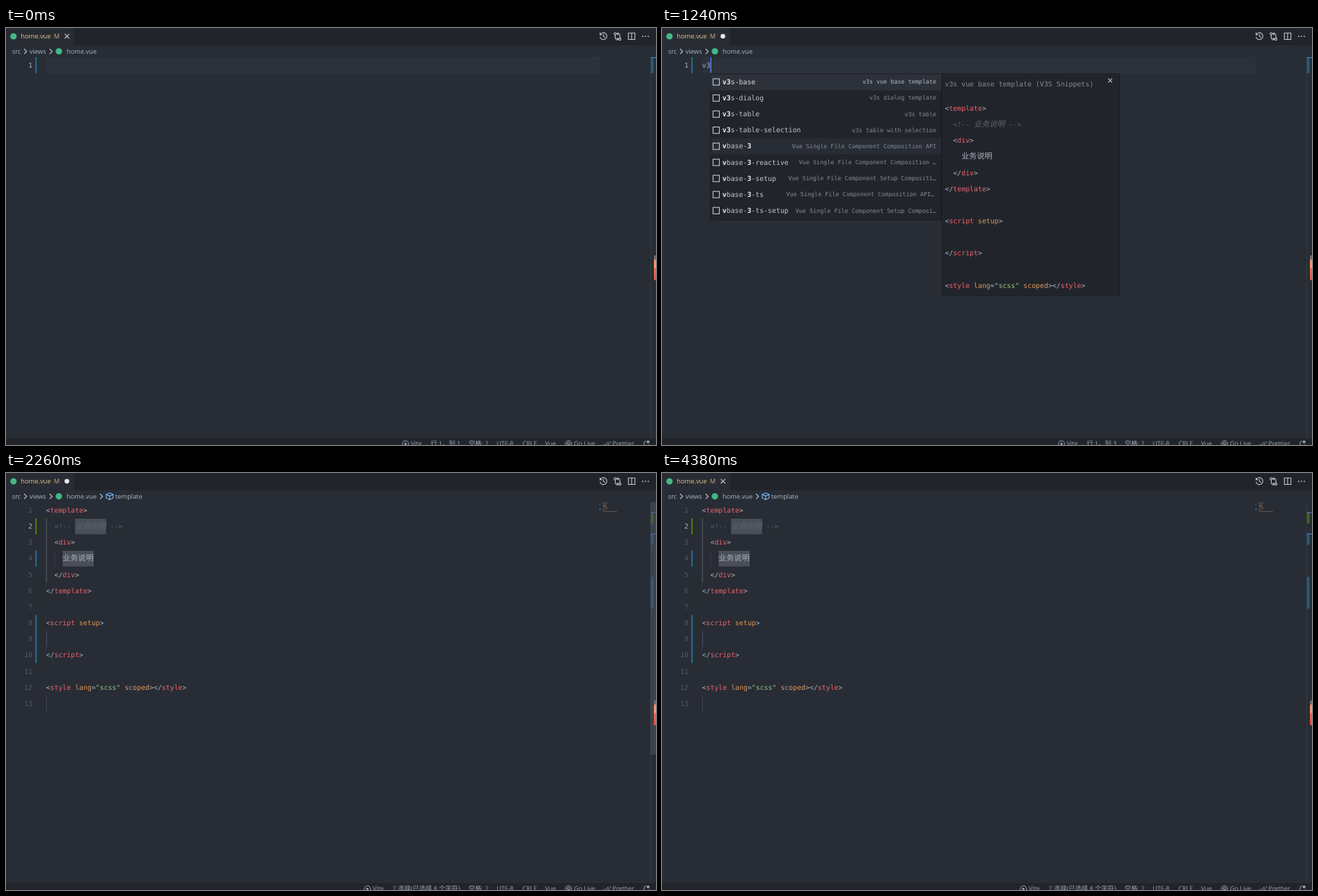
These frames come from a looping animation (934 px wide and 600 px high, 4.54 s). An HTML page:

```html
<!DOCTYPE html>
<html lang="zh">
<head>
<meta charset="utf-8">
<title>Snippet completion</title>
<style>
  html, body { margin: 0; width: 100%; height: 100%; overflow: hidden; background: #282c34; }
  svg { display: block; }
  text { white-space: pre; fill: #abb2bf; text-rendering: geometricPrecision; }
  .ui { font: 9.3px "Open Sans", "Noto Sans CJK SC", sans-serif; }
  .status { font: 9px "Open Sans", "Noto Sans CJK SC", sans-serif; fill: #9da5b4; }
  .code { font: 9.87px "DejaVu Sans Mono", "Noto Sans CJK SC", monospace; }
  .detail { font: 8.42px "DejaVu Sans Mono", monospace; fill: #848a95; }
  .cjk { font-family: "Noto Sans CJK SC", sans-serif; font-size: 11.1px; }
  .status .cjk { font-size: 9.3px; }
  .match { font-weight: bold; fill: #eceef2; }
  .line { fill: none; stroke: #c5c9d0; stroke-width: 1.1; }
  .thin { fill: none; stroke: #9da5b4; stroke-width: 1; }
</style>
</head>
<body>
<svg id="stage" width="934" height="600" viewBox="0 0 934 600">
  <defs>
    <pattern id="hatch" width="3" height="3" patternUnits="userSpaceOnUse">
      <rect width="3" height="3" fill="#1f5467"/>
      <path d="M0 3L3 0" stroke="#1b81a8" stroke-width="1.3"/>
    </pattern>
    <linearGradient id="warm" x2="0" y2="1">
      <stop stop-color="#f58b5c"/><stop offset=".4" stop-color="#f9a070"/>
      <stop offset=".4" stop-color="#ee6c4c"/><stop offset="1" stop-color="#e9503f"/>
    </linearGradient>
  </defs>
  <g id="scene"></g>
</svg>
<script>
const LOOP = 4540;
const STEPS = [0, 540, 960, 1100, 1240, 1500, 1760, 1880, 2010, 2260, 2600, 2720,
  3180, 3730, 3960, 4120, 4260, 4380];
const CHAR = 5.94, ROW = 23.15, LEFT = 57.6, TOP = 42;
const COLORS = { comment: '#5c6370', tag: '#f0626a', string: '#95c77a', attr: '#d9985f', plain: '#abb2bf' };

const SNIPPET = [
  '<template>',
  '  <!-- 业务说明 -->',
  '  <div>',
  '    业务说明',
  '  </div>',
  '</template>',
  '',
  '<script setup>',
  '',
  '<\/script>',
  '',
  '<style lang="scss" scoped></style>',
  ''
];

const SFC = 'Vue Single File Component';
const SUGGESTIONS = [
  ['v3s-base', 'v3s vue base template'],
  ['v3s-dialog', 'v3s dialog template'],
  ['v3s-table', 'v3s table'],
  ['v3s-table-selection', 'v3s table with selection'],
  ['vbase', SFC],
  ['vbase-3', SFC + ' Composition API'],
  ['vbase-3-reactive', SFC + ' Composition …'],
  ['vbase-3-setup', SFC + ' Setup Compositi…'],
  ['vbase-3-ts', SFC + ' Composition API…', 3],
  ['vbase-3-ts-setup', SFC + ' Setup Composi…'],
  ['vbase-css', SFC + ' with Css'],
  ['vbase-less', SFC + ' with LESS']
];

const rect = (x, y, w, h, fill, extra = '') =>
  `<rect x="${x}" y="${y}" width="${w}" height="${h}" fill="${fill}" ${extra}/>`;
const circle = (x, y, r, extra) => `<circle cx="${x}" cy="${y}" r="${r}" ${extra}/>`;
const path = (d, cls = 'line', extra = '') => `<path class="${cls}" d="${d}" ${extra}/>`;
const escape = s => s.replace(/&/g, '&amp;').replace(/</g, '&lt;');
const wrapCjk = s => s.replace(/[\u4e00-\u9fff，]+/g, '<tspan class="cjk">$&</tspan>');
const text = (cls, x, y, markup, extra = '') => `<text class="${cls}" x="${x}" y="${y}" ${extra}>${markup}</text>`;
const cross = (x, y, r) => path(`M${x - r} ${y - r}l${2 * r} ${2 * r}m0 ${-2 * r}l${-2 * r} ${2 * r}`);
const lineTop = n => TOP + ROW * (n - 1);

function tokenize(line) {
  const rule = /(?<comment><!--.*-->)|(?<tag>(?<=<\/?)[a-z]+)|(?<string>".*?")|(?<attr>[a-z]+)|(?<plain>[^a-z"])/g;
  return [...line.matchAll(rule)].map(m => ({
    value: m[0], start: m.index, kind: Object.keys(m.groups).find(k => m.groups[k])
  }));
}

function codeLine(x, y, line, colored) {
  const markup = colored
    ? tokenize(line).map(({ value, kind }) =>
        `<tspan style="fill:${COLORS[kind]}${kind === 'comment' ? ';font-style:italic' : ''}">${wrapCjk(escape(value))}</tspan>`).join('')
    : wrapCjk(escape(line));
  return text('code', x, y, markup);
}

function minimap(lines, colored) {
  return lines.map((line, i) => tokenize(line).filter(k => k.value.trim()).map(({ value, start, kind }) =>
    rect(857 + start * 0.62, 42.4 + i * 1.16, value.length * 0.62, 0.8,
      colored ? COLORS[kind] : '#7d93ab', 'opacity=".55"')).join('')).join('');
}

function titleBar(modified, symbol) {
  const logo = (x, y) => circle(x, y, 4.6, 'fill="#41b883"');
  const chevron = x => path(`M${x - 1.8} 30l3.6 3.7-3.6 3.7`);
  let out = rect(0, 0, 934, 25, '#21252b') + rect(0, 0, 98, 25, '#282c34') + logo(10.8, 12)
    + text('ui', 21.3, 15.3, 'home.vue', 'style="fill:#e2c08d"')
    + text('ui', 68.8, 15.3, 'M', 'style="fill:#c9ac7f"')
    + (modified ? circle(87.5, 11.8, 3.4, 'fill="#e4e6ea"') : cross(87.6, 11.8, 3.2));
  // Editor actions: history, compare, split, more
  out += path('M854 9.3a5 5 0 1 1-.5 3.4M853.6 6.8v3h3M858.5 8.8v3.4l2.4 1.2')
    + circle(875.4, 8.3, 1.6, 'class="line"') + circle(882, 16, 1.6, 'class="line"')
    + path('M875.4 10v4.5q0 1.5 1.5 1.5h2.4m-1.6-1.8l1.8 1.8-1.8 1.8M882 14.3V9.8q0-1.5-1.5-1.5h-2.3m1.6-1.8l-1.8 1.8 1.8 1.8')
    + path('M894.3 7.3h9.4v9.2h-9.4zM899 7.3v9.2')
    + [915, 919, 923].map(x => circle(x, 12, 0.9, 'fill="#c5c9d0"')).join('');
  out += text('ui', 8.8, 37.3, 'src') + chevron(27.8) + text('ui', 33.8, 37.3, 'views') + chevron(64.5)
    + logo(76, 33.6) + text('ui', 87, 37.3, 'home.vue');
  if (symbol) {
    out += chevron(137)
      + path('M149 28.8l5 2v5.2l-5 2.4-5-2.4v-5.2zM144 30.9l5 2.2 5-2.2M149 33.1v5.2', 'line', 'style="stroke:#75beff"')
      + text('ui', 157, 37.3, 'template');
  }
  return out;
}

function statusBar(position, viteX) {
  const label = (x, s) => text('status', x, 601.4, wrapCjk(s));
  return rect(0, 590, 934, 10, '#21252b')
    + circle(viteX - 7.7, 598.3, 4.4, 'class="thin"') + circle(viteX - 7.7, 598.3, 1.6, 'fill="#9da5b4"')
    + label(viteX, 'Vite') + label(viteX + 28.5, position)
    + label(664.8, '空格: 2') + label(705, 'UTF-8') + label(742, 'CRLF') + label(774.5, 'Vue')
    + circle(808.3, 598, 4.2, 'class="thin"') + circle(808.3, 598, 2, 'class="thin"') + path('M808.3 598v4', 'thin')
    + label(816, 'Go Live') + path('M859 598.5l2 2.3 4.6-5.6M863.4 600l1 .8 4.6-5.6', 'thin') + label(871.3, 'Prettier')
    + path('M916 600.5l1-1.5v-2q0-2.6 3-2.6M924 600v-1', 'thin') + circle(922.6, 595.6, 2, 'fill="#9da5b4"');
}

// Positions of the query's letters inside the label, or null when they do not all occur in order.
function fuzzyMatch(label, query) {
  const hits = [];
  for (const letter of query) {
    const at = label.indexOf(letter, hits.length ? hits.at(-1) + 1 : 0);
    if (at < 0) return null;
    hits.push(at);
  }
  return hits;
}

function suggestions(query, showScrollbar) {
  const x = LEFT + CHAR * query.length, top = 66, panel = x + 333;
  const rows = SUGGESTIONS.filter(([label]) => fuzzyMatch(label, query));
  let out = rect(x, top, 332, rows.length * ROW + 2, '#21252b', 'stroke="#1c1f25"')
    + rect(x, top + 0.5, 332, ROW, '#2c313a') + rect(x, top + 4 * ROW, 332, ROW, '#282c34');
  rows.forEach(([label, detail, inset = 0], i) => {
    const y = top + i * ROW, hits = fuzzyMatch(label, query);
    const name = [...label].map((c, k) => hits.includes(k) ? `<tspan class="match">${c}</tspan>` : c).join('');
    out += rect(x + 3.9, y + 7, 9, 9.2, 'none', 'class="line"')
      + text('code', x + 17.3, y + 14.8, name, `style="fill:${i ? '#bfc4cd' : '#d7dae0'}"`)
      + text('detail', x + 324.7 - inset, y + 14.3, detail, `text-anchor="end" ${i ? '' : 'style="fill:#b4b9c2"'}`);
  });
  if (showScrollbar) out += rect(x + 324, top, 8, 30, '#4e5666', 'opacity=".3"');
  out += rect(panel, top, 255, 319.5, '#21252b', 'stroke="#1c1f25"') + cross(panel + 241.5, 75.5, 2.8)
    + text('code', panel + 4, 83.7, 'v3s vue base template (V3S Snippets)', 'style="fill:#858a94"');
  return out + SNIPPET.map((line, i) => codeLine(panel + 4, 119 + i * ROW, line, true)).join('');
}

const gutterMark = (first, count, fill) => rect(42, lineTop(first), 2.2, ROW * count, fill);
const lineNumber = (n, active) =>
  text('code', 38, lineTop(n) + 15, n, `text-anchor="end" style="fill:${active ? '#abb2bf' : '#4f586a'}"`);
const rulerMark = (y, h, fill) => rect(926.5, y, 4, h, fill);
const rulerCursor = y => rect(926.5, y, 7.5, 1.2, '#4a7bd8');
const caret = (x, line) => rect(x, lineTop(line), 1.4, ROW - 0.6, '#528bff');

function typingView(t) {
  const query = t < 540 ? '' : t < 1240 ? 'v' : t < 1500 ? 'v3' : 'v3s';
  let out = rect(58, TOP, 795, ROW, query ? '#2c313c' : '#2b323b')
    + gutterMark(1, 1, 'url(#hatch)') + lineNumber(1, true) + rect(853, 42, 1, 1.2, '#1b81a8')
    + minimap([query], false) + rulerMark(43, 22, '#1f5c74') + rulerCursor(42);
  if (query) out += text('code', LEFT, TOP + 15, query) + caret(LEFT + CHAR * query.length, 1);
  if (t >= 960) out += suggestions(query, t >= 1100 && t < 1240);
  return out + statusBar(`行 1，列 ${query.length + 1}`, 581.7);
}

function snippetView(t) {
  const colored = t >= 1880, diffed = t >= 2010;
  const caretsOn = t < 2260 || (t >= 2720 && t < 3180) || (t >= 3730 && t < 4120);
  const fade = STEPS.filter(s => s >= 3960 && s <= t).length;
  const guide = (x, line, count, color) => rect(x, lineTop(line), 1, ROW * count, color);
  let out = rect(99.2, 65.8, 44.6, 22.4, '#4a4e57') + rect(81.3, 112, 44.8, 22.4, '#4a4e57')
    + guide(57.6, 2, 4, '#5d626b') + guide(69.5, 4, 1, '#3b4048')
    + guide(57.8, 9, 1, '#4d525b') + guide(57.6, 13, 1.05, '#424750');
  SNIPPET.forEach((line, i) => {
    out += lineNumber(i + 1, i === 1) + codeLine(LEFT, lineTop(i + 1) + 15, line, colored);
  });
  out += minimap(SNIPPET, colored);
  if (diffed) {
    out += gutterMark(2, 1, '#487e02') + gutterMark(4, 1, 'url(#hatch)') + gutterMark(8, 3, 'url(#hatch)')
      + rect(853, 43.5, 1, 1.2, '#487e02') + rect(853, 45.8, 1, 1.2, '#1b81a8') + rect(853, 50.4, 1, 3.6, '#1b81a8')
      + rulerMark(57.3, 15.2, '#42631b') + rulerMark(88, 15.3, '#255a76') + rulerMark(149.5, 45.8, '#255a76');
  } else {
    out += gutterMark(1, 1, 'url(#hatch)') + rulerMark(42, 15, '#1f5c74');
  }
  out += rulerCursor(56.3) + rulerCursor(87);
  if (colored) out += rect(926, 42, 8, 363, '#4e5666', `opacity="${0.5 * (1 - fade / 4)}"`);
  if (caretsOn) out += caret(143.6, 2) + caret(125.8, 4);
  return out + statusBar('2 选择(已选择 8 个字符)', 527);
}

function scene(t) {
  return rect(0, 0, 934, 600, '#282c34')
    + titleBar(t >= 960 && t < 2600, t >= 2260)
    + rect(926, 42, 0.8, 548, '#3a3f48')
    + (t < 1760 ? typingView(t) : snippetView(t))
    + rect(931, 327, 5, 10, '#6b6d72', 'rx="2"') + rect(931, 333, 5, 30, 'url(#warm)', 'rx="1.5"');
}

const layer = document.getElementById('scene');
let shown = -1;
function tick() {
  const now = performance.now() % LOOP;
  const step = STEPS.findLast(s => s <= now);
  if (step !== shown) {
    shown = step;
    layer.innerHTML = scene(step);
  }
  requestAnimationFrame(tick);
}
tick();
</script>
</body>
</html>
```
